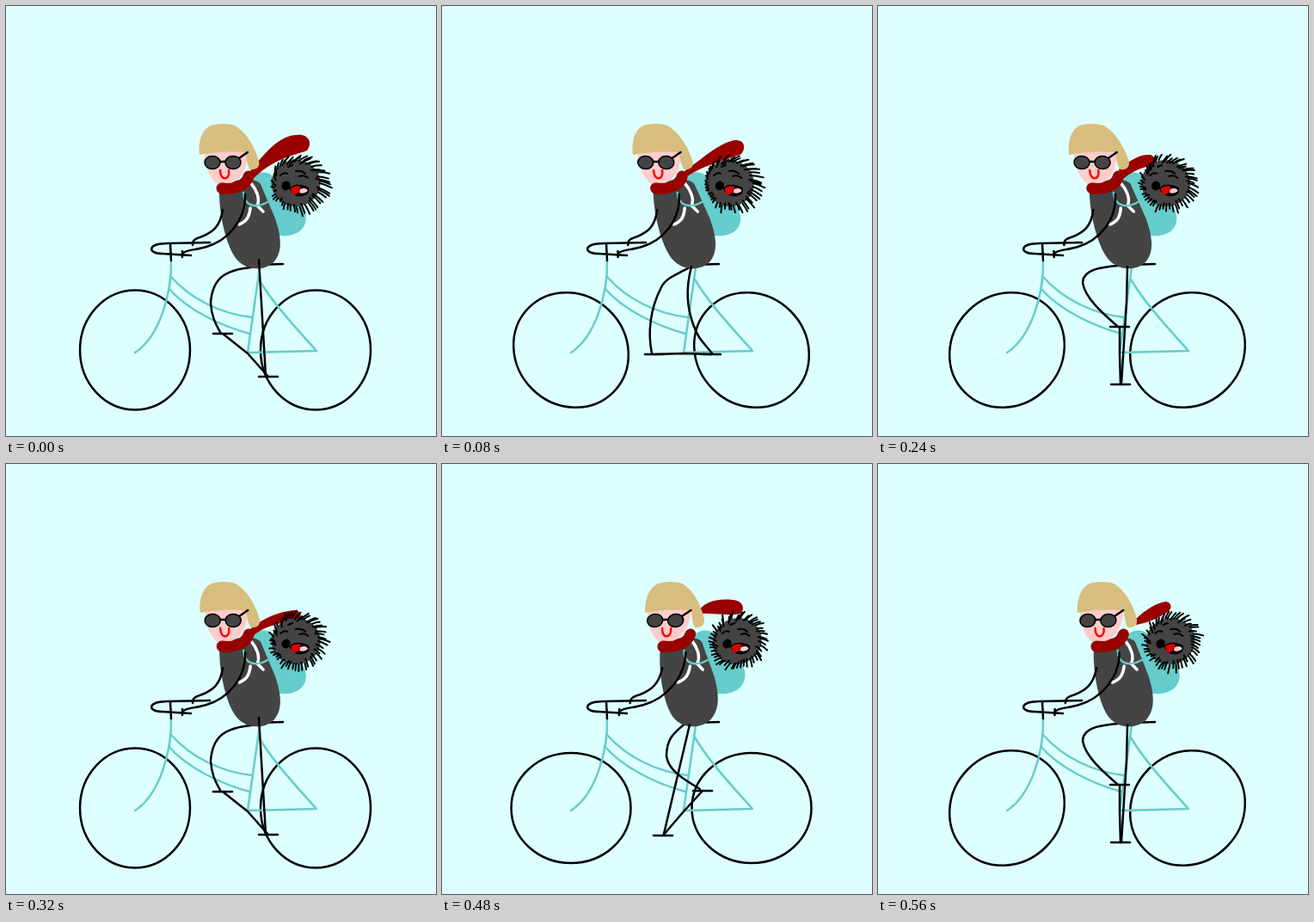
Recreate the animation shown at these times as an HTML page with a canvas. Size 500 by 500 pixels, loop 0.64 s.

```html
<!DOCTYPE html>
<html lang="en">
<head>
<meta charset="utf-8">
<title>Cyclist with a dog</title>
<style>
  html, body { margin: 0; width: 100%; height: 100%; overflow: hidden; background: #dff; }
  canvas { display: block; }
</style>
</head>
<body>
<canvas id="stage" width="500" height="500"></canvas>
<script>
const ctx = document.getElementById('stage').getContext('2d');
const STEP = 80, STEPS = 8, HIP = 306;
const TEAL = '#6cc', COAT = '#444', RED = '#900', HAIR = '#d7be7e';

// Sideways lean of the rider, extra swing of the hair, and wind in the fur
const lean = [0, -.026, -.053, -.024, .002, .029, .062, .031];
const hairSwing = [0, .5, 1, .5, .5, 1, 3, 3];
const wind = [.65, .6, .7, .35, .3, .2, .05, .25];

const scarfTails = [
  'M284 192C300 172 318 150 338 150C352 148 357 160 350 168C340 173 316 174 288 200Z',
  'M282 192C300 180 320 160 340 156C352 155 354 165 348 172C335 178 305 184 284 199Z',
  'M276 192C300 184 322 174 338 163C346 161 349 168 347 172L340 182C320 184 300 190 280 197Z',
  'M280 190C295 178 305 172 317 173C322 175 324 180 320 186C310 186 295 192 284 202Z',
  'M284 192C300 178 318 172 334 170C345 170 346 180 335 184C315 184 300 190 288 199Z',
  'M288 188C305 172 325 163 342 164C352 165 354 174 348 179C325 180 310 186 292 196Z',
  'M296 174C304 160 320 156 338 158C350 159 353 168 347 174C332 177 315 173 298 174Z',
  'M298 182C312 168 325 161 335 160C342 161 342 168 337 172C325 180 312 185 300 187Z'
];

// One pedal turn: legs and the two pedal centres
const poses = [
  { far: 'M300 303C252 304 240 318 238 345C239 362 244 370 250 381', near: 'M294 295L302 430', pedals: [252, 381, 305, 431] },
  { far: 'M290 303C268 314 259 318 255 327C242 352 239 380 244 404', near: 'M290 303C283 330 285 350 292 370C298 388 306 393 314 404', pedals: [247, 405, 313, 405] },
  { far: 'M288 298C266 314 261 322 261 340C264 358 284 368 300 378', near: 'M288 303L258 430', pedals: [303, 380, 257, 432] },
  { far: 'M292 301C256 303 238 307 238 322C241 340 262 358 278 372', near: 'M290 303L289 345L283 439', pedals: [281, 373, 282, 440] }
];

function fill(path, color) {
  ctx.fillStyle = color;
  ctx.fill(new Path2D(path));
}

function line(path, color = '#000', width = 2.5) {
  ctx.strokeStyle = color;
  ctx.lineWidth = width;
  ctx.stroke(new Path2D(path));
}

function oval(x, y, rx, ry, angle = 0) {
  ctx.beginPath();
  ctx.ellipse(x, y, rx, ry, angle, 0, Math.PI * 2);
}

function seeded(seed) {
  return () => {
    seed = (seed * 16807) % 2147483647;
    return seed / 2147483647;
  };
}

function drawBike(step) {
  ctx.strokeStyle = '#000';
  ctx.lineWidth = 2.5;
  for (const x of [150, 360]) {
    oval(x, 400, 64, 69.5, -step * Math.PI / 4);
    ctx.stroke();
  }
  line('M192 296C193 335 178 385 150 403', TEAL);
  line('M192 315C215 341 250 358 286 362', TEAL);
  line('M189 328C210 353 250 372 283 381', TEAL);
  line('M295 304L281 403L361 401C335 372 310 345 294 318', TEAL);
  line('M191 276L192 296M237 275L188 276C164 276 164 288 182 288L215 290');
  line('M290 301L322 300');
}

function drawPedals([x1, y1, x2, y2]) {
  line(`M${x1} ${y1}L281 404L${x2} ${y2}`);
  line(`M${x1 - 11} ${y1}h22M${x2 - 11} ${y2}h22`);
}

function drawDog(step) {
  const random = seeded(91 + step * 577);
  const cx = 337, cy = 206;
  oval(cx, cy, 28.5, 27);
  ctx.fillStyle = COAT;
  ctx.fill();
  let fur = '';
  const hairs = 50;
  for (let i = 0; i < hairs; i++) {
    const angle = (i + random() * .6) / hairs * Math.PI * 2;
    const base = 23 + random() * 5, length = 6 + random() * 4;
    const x = cx + base * Math.cos(angle), y = cy + base * Math.sin(angle);
    const dx = length * (Math.cos(angle + .45) + wind[step]);
    const dy = length * (Math.sin(angle + .45) + wind[step] * .25);
    fur += `M${x} ${y}q${dx * .5} ${dy * .5 - 1} ${dx} ${dy}`;
  }
  line(fur, '#000', 2);
  line('M319 197q4-4 8-2M337 192q7-1 11 3M341 198q6-2 10 2M328 187l5-2', '#000', 2);
  oval(325.5, 209, 5, 5.5, .5);
  ctx.fillStyle = '#000';
  ctx.fill();
  fill('M329 212Q337 204 352 211Q354 219 345 221Q334 223 329 212Z', '#000');
  fill('M331 212Q336 208 343 210L340 217L335 220Q331 217 331 212Z', '#d00');
  fill('M342 213Q349 210 351 215Q347 219 341 217Z', '#fcc');
}

function drawTorso() {
  fill('M248 216C248 245 256 275 265 290C276 309 301 309 312 297C322 285 320 268 313 247L296 207C290 198 255 200 248 216Z', COAT);
  line('M284 205C291 213 296 224 292 232L299 239', '#fff', 3.5);
  line('M284 235C283 246 279 251 271 254', '#fff', 3.5);
  line('M276 217C277 234 292 235 304 228', TEAL);
  line('M278 219C279 250 257 273 233 280C221 284 209 283 205 288M205 285V292');
  line('M252 237C249 257 240 263 228 268C219 271 217 272 217 278');
}

function drawHead(swing) {
  fill('M231 166C230 185 236 199 246 207C262 212 283 198 281 166Z', '#fcc');
  line('M251 212C262 214 279 210 282 198', RED, 13);
  ctx.save();
  ctx.translate(swing, 0);
  fill('M225 173C223 156 229 140 242 138C251 136 261 137 266 139C280 147 290 165 294 180C296 188 290 191 284 190C280 185 280 176 278 170Q250 168 225 173Z', HAIR);
  ctx.restore();
  line('M248 181H257M271 177L281 170');
  for (const x of [240, 264]) {
    oval(x, 182, 9, 7.5);
    ctx.fillStyle = COAT;
    ctx.fill();
    ctx.lineWidth = 1.5;
    ctx.stroke();
  }
  line('M249 191C249 204 261 203 259 191', '#f00');
}

function draw(step) {
  const pose = poses[step % 4], tilt = lean[step];
  const leaning = () => ctx.setTransform(1, 0, -tilt, 1, HIP * tilt, 0);
  const upright = () => ctx.setTransform(1, 0, 0, 1, 0, 0);
  upright();
  ctx.lineCap = ctx.lineJoin = 'round';
  ctx.fillStyle = '#dff';
  ctx.fillRect(0, 0, 500, 500);
  drawBike(step);
  drawPedals(pose.pedals);
  line(pose.far);
  leaning();
  fill('M284 202C291 192 302 192 308 196L345 234C352 245 349 259 338 264C326 270 312 267 300 262Z', TEAL);
  upright();
  fill(scarfTails[step], RED);
  leaning();
  drawDog(step);
  drawTorso();
  drawHead(hairSwing[step]);
  upright();
  line(pose.near);
}

const start = performance.now();
function tick() {
  draw(Math.floor((performance.now() - start) / STEP) % STEPS);
  requestAnimationFrame(tick);
}
tick();
</script>
</body>
</html>
```
